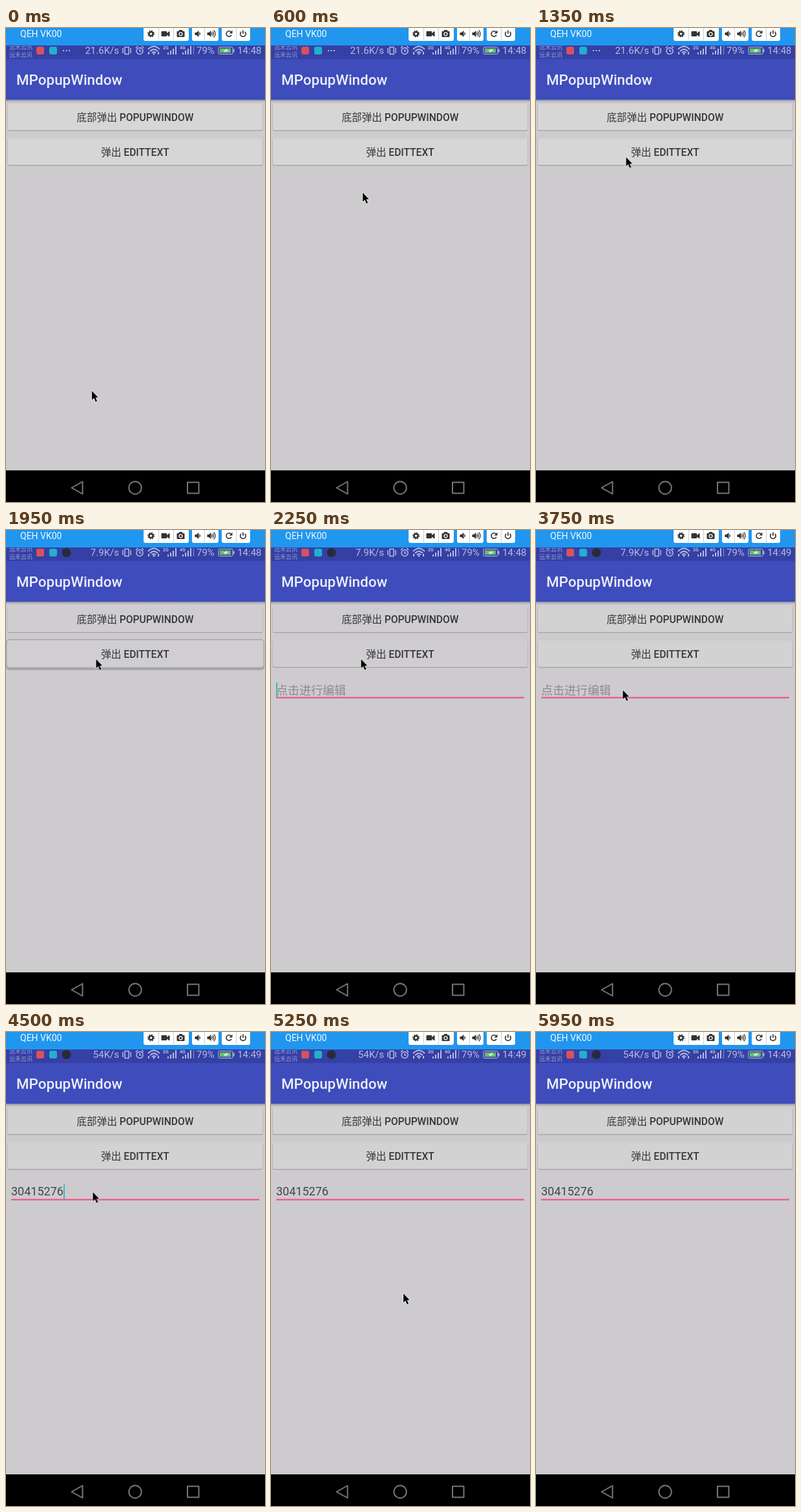
Write an HTML page that moves like this. It is 401 px wide and 734 px high and loops after 6050 ms.

```html
<!DOCTYPE html>
<html lang="zh-CN">
<head>
<meta charset="utf-8">
<title>MPopupWindow</title>
<style>
html, body { margin: 0; width: 100%; height: 100%; overflow: hidden; background: #cdcbce; }
svg { display: block; }
text, .field { font-family: Roboto, "Noto Sans CJK SC", "Noto Sans CJK", sans-serif; }
.label { font-size: 15.6px; font-weight: 500; fill: #353537; text-anchor: middle; }
.status { fill: #b5bbe3; font-size: 15px; }
.line { fill: none; stroke: #b5bbe3; stroke-width: 1.5; }
.tool { fill: none; stroke: #333; stroke-width: 1.6; }
.field { display: flex; height: 22px; font-size: 18px; line-height: 22px; color: #454448; }
.typed { overflow: hidden; white-space: nowrap; width: 0; }
.caret { width: 2px; height: 23px; background: #3fb7bb; }

/* One loop is 6050 ms; 150 ms is about 2.479 %. */
.anim, .typed, .caret { animation: 6050ms step-end infinite; }
.speed-a { animation-name: speed-a; }
.speed-b { animation-name: speed-b; }
.speed-c { animation-name: speed-c; }
.dots { animation-name: speed-a; }
.badge { animation-name: badge; }
.clock-a { animation-name: clock-a; }
.clock-b { animation-name: clock-b; }
.face { animation-name: face; }
.pressed { animation-name: pressed; }
.edit { animation-name: edit; }
.hint { animation-name: hint; }
.typed { animation-name: typed; }
.caret { animation-name: caret; }
.cursor { animation-name: cursor; }

@keyframes speed-a { 0% { opacity: 1 } 27.272%, 100% { opacity: 0 } }
@keyframes speed-b { 0% { opacity: 0 } 27.272% { opacity: 1 } 74.38%, 100% { opacity: 0 } }
@keyframes speed-c { 0% { opacity: 0 } 74.38%, 100% { opacity: 1 } }
@keyframes badge { 0% { opacity: 0 } 27.272%, 100% { opacity: 1 } }
@keyframes clock-a { 0% { opacity: 1 } 59.504%, 100% { opacity: 0 } }
@keyframes clock-b { 0% { opacity: 0 } 59.504%, 100% { opacity: 1 } }
@keyframes face { 0% { fill: #d7d6d7 } 29.752% { fill: #cfcdd0 } 49.586%, 100% { fill: #d3d2d3 } }
@keyframes pressed { 0% { opacity: 0 } 29.752% { opacity: 1 } 34.71%, 100% { opacity: 0 } }
@keyframes edit { 0% { opacity: 0 } 34.71%, 100% { opacity: 1 } }
@keyframes hint { 0% { opacity: 1 } 64.462%, 100% { opacity: 0 } }
@keyframes typed {
  0% { width: 0 } 64.462% { width: 1ch } 66.942% { width: 3ch }
  69.421% { width: 4ch } 71.9% { width: 6ch } 74.38%, 100% { width: 8ch }
}
@keyframes caret {
  0% { opacity: 0 } 37.19% { opacity: 1 } 44.628% { opacity: 0 } 54.545% { opacity: 1 }
  61.983% { opacity: 0 } 64.462% { opacity: 1 } 81.818% { opacity: 0 }
  91.735% { opacity: 1 } 98.347%, 100% { opacity: 0 }
}
@keyframes cursor {
  0% { transform: translate(133px, 562px) }
  2.479% { transform: translate(133px, 542px) }
  4.958% { transform: translate(136px, 455px) }
  7.438% { transform: translate(140px, 340px) }
  9.917% { transform: translate(142px, 255px) }
  12.396% { transform: translate(141px, 213px) }
  14.876% { transform: translate(139.5px, 200px) }
  44.628% { transform: translate(139px, 208px) }
  47.107% { transform: translate(138px, 226px) }
  49.586% { transform: translate(136px, 243px) }
  52.066% { transform: translate(135px, 252px) }
  54.545% { transform: translate(134.5px, 248px) }
  81.818% { transform: translate(137px, 254px) }
  84.297% { transform: translate(155px, 290px) }
  86.776% { transform: translate(205px, 405px) }
  89.256% { transform: translate(290px, 560px) }
  91.735% { transform: translate(370px, 690px) }
  94.214%, 100% { transform: translate(420px, 760px) }
}
</style>
</head>
<body>
<svg width="401" height="734" viewBox="0 0 401 734">
  <defs>
    <linearGradient id="shade" x2="0" y2="1">
      <stop stop-color="#8f8fa3"/><stop offset="1" stop-color="#cdcbce"/>
    </linearGradient>
    <clipPath id="bar"><rect y="27" width="401" height="21"/></clipPath>
    <g id="bars">
      <path d="M5 41v-3M9 41v-6M13 41v-9M17 41v-13" stroke="#b5bbe3" stroke-width="2"/>
    </g>
    <path id="speaker" d="M-4-2h2.500l3.500-3v10l-3.500-3h-2.500z" fill="#333"/>
  </defs>

  <rect width="401" height="734" fill="#cdcbce"/>

  <!-- mirror toolbar -->
  <rect width="401" height="27" fill="#2196ee"/>
  <text x="22" y="14" font-size="14" fill="#f4faff">QEH VK00</text>
  <g fill="#fff">
    <rect x="213" y="-4" width="70" height="24" rx="3"/>
    <rect x="288" y="-4" width="41" height="24" rx="3"/>
    <rect x="334" y="-4" width="44" height="24" rx="3"/>
  </g>
  <path d="M236.500 0v19M259.500 0v19M307.500 0v19M356.500 0v19" stroke="#ccc"/>
  <g transform="translate(224.500 9)">
    <circle r="3" class="tool" stroke-width="2.600" style="stroke-width:2.6"/>
    <circle r="4.700" class="tool" stroke-dasharray="1.850 1.840"/>
  </g>
  <path d="M241 5.500h7.500v7h-7.500zM249 8.500l4-3v7.500l-4-3z" fill="#333" stroke="#333" stroke-linejoin="round"/>
  <path d="M265 5.500h2.500l1-2h4l1 2h2.500v8h-11z" fill="#333" stroke="#333" stroke-linejoin="round"/>
  <circle cx="270.500" cy="9.300" r="2.500" fill="#333" stroke="#fff" stroke-width="1.300"/>
  <use href="#speaker" x="296.500" y="9"/>
  <path d="M299.500 7q1.800 2 0 4" class="tool" style="stroke-width:1.2"/>
  <use href="#speaker" x="315.500" y="9"/>
  <path d="M318.500 7q1.800 2 0 4M320 5.300q3.300 3.700 0 7.400M321.700 3.500q5 5.500 0 11" class="tool" style="stroke-width:1.2"/>
  <path d="M348.300 6a4.200 4.200 0 1 0 .7 5" class="tool"/>
  <path d="M350.500 3.500v5h-5z" fill="#333"/>
  <path d="M364.300 5.800a4.300 4.300 0 1 0 5.400 0M367 3.500v5.500" class="tool"/>

  <!-- phone status bar -->
  <rect y="27" width="401" height="21" fill="#3540a5"/>
  <g clip-path="url(#bar)">
    <g class="status" opacity=".75">
      <text x="5" y="33" font-size="9">远禾云讯</text>
      <text x="5" y="45" font-size="9">远禾云讯</text>
    </g>
    <rect x="47" y="29" width="12" height="12" rx="3" fill="#d9515c"/>
    <rect x="67" y="29" width="12" height="12" rx="3" fill="#22afd0"/>
    <path class="anim dots" d="M88 35h2m2.500 0h2m2.500 0h2" stroke="#b5bbe3" stroke-width="2"/>
    <circle class="anim badge" cx="93.500" cy="35" r="7" fill="#292b3a"/>
    <g class="status" text-anchor="end">
      <text class="anim speed-a" x="175" y="40">21.6K/s</text>
      <text class="anim speed-b" x="175" y="40">7.9K/s</text>
      <text class="anim speed-c" x="175" y="40">54K/s</text>
      <text class="anim clock-a" x="395.500" y="40">14:48</text>
      <text class="anim clock-b" x="395.500" y="40">14:49</text>
    </g>
    <text class="status" x="295" y="40">79%</text>
    <g class="line">
      <path d="M184 29.500h6v11h-6zM181 31v8M193 31v8"/>
      <circle cx="207" cy="35.500" r="5"/>
      <path d="M207 32.500v3.500h2.500M201 31l3-3M210 28l3 3"/>
      <path d="M220 33q9-9 18 0M223 36q6-6 12 0M226 38.500q3-3 6 0" stroke-width="1.800"/>
      <path d="M221 41v-4M236 41v-4" stroke-width="2"/>
      <path d="M290.500 28v13" opacity=".5"/>
    </g>
    <circle cx="229" cy="40" r="1.500" fill="#b5bbe3"/>
    <use href="#bars" x="246"/>
    <use href="#bars" x="269"/>
    <g class="status" font-weight="700">
      <text x="243" y="33" style="font-size:7px">2G</text>
      <text x="269" y="33" style="font-size:7px">4G</text>
    </g>
    <rect x="329" y="29.500" width="22" height="11" rx="1.500" fill="none" stroke="#b5bbe3"/>
    <rect x="331" y="31.500" width="17" height="7" fill="#65bd68"/>
    <path d="M352.500 32.500v5" stroke="#b5bbe3" stroke-width="2"/>
    <path d="M336 34l4 .5 1-2.500 4 4-4-.5-1 2.500z" fill="#e4f2e6"/>
  </g>

  <!-- app bar -->
  <rect y="48" width="401" height="63" fill="#3e4dbb"/>
  <rect y="111" width="401" height="4" fill="url(#shade)"/>
  <text x="16" y="88" font-size="22.400" font-weight="500" fill="#eceefa">MPopupWindow</text>

  <!-- buttons -->
  <g fill="#aaa8ab">
    <rect x="2.500" y="118" width="395" height="41.500" rx="2.500"/>
    <rect x="2.500" y="172" width="395" height="41.500" rx="2.500"/>
  </g>
  <g>
    <rect class="anim face" x="3" y="117.500" width="394" height="40.500" rx="2"/>
    <rect class="anim face" x="3" y="171.500" width="394" height="40.500" rx="2"/>
  </g>
  <g class="anim pressed">
    <rect x="0" y="169" width="400" height="48" rx="5" fill="#a7a6a9"/>
    <rect x="1.500" y="170.500" width="397" height="42" rx="4" fill="#d0ced1"/>
  </g>
  <text class="label" x="200" y="144">底部弹出 POPUPWINDOW</text>
  <text class="label" x="200" y="198">弹出 EDITTEXT</text>

  <!-- edit field -->
  <g class="anim edit">
    <text class="anim hint" x="8" y="254.500" font-size="18" fill="#8c8a8d">点击进行编辑</text>
    <rect x="8" y="258.500" width="384" height="2.200" fill="#f2518b"/>
    <foreignObject x="8" y="236" width="384" height="24">
      <div class="field"><span class="typed">30415276</span><i class="caret"></i></div>
    </foreignObject>
  </g>

  <!-- navigation bar -->
  <rect y="685" width="401" height="49" fill="#000"/>
  <g fill="none" stroke="#777" stroke-width="2" stroke-linejoin="round">
    <path d="M101.500 712l17-9.500v19z"/>
    <circle cx="200" cy="712" r="9.700"/>
    <rect x="281" y="703.500" width="17.500" height="17"/>
  </g>

  <path class="anim cursor" d="M0 0V14L3.200 11 5.700 16.800 8 15.800 5.600 10.200H9.800Z" stroke="#fff" stroke-width="1.200" paint-order="stroke"/>
</svg>
</body>
</html>
```
